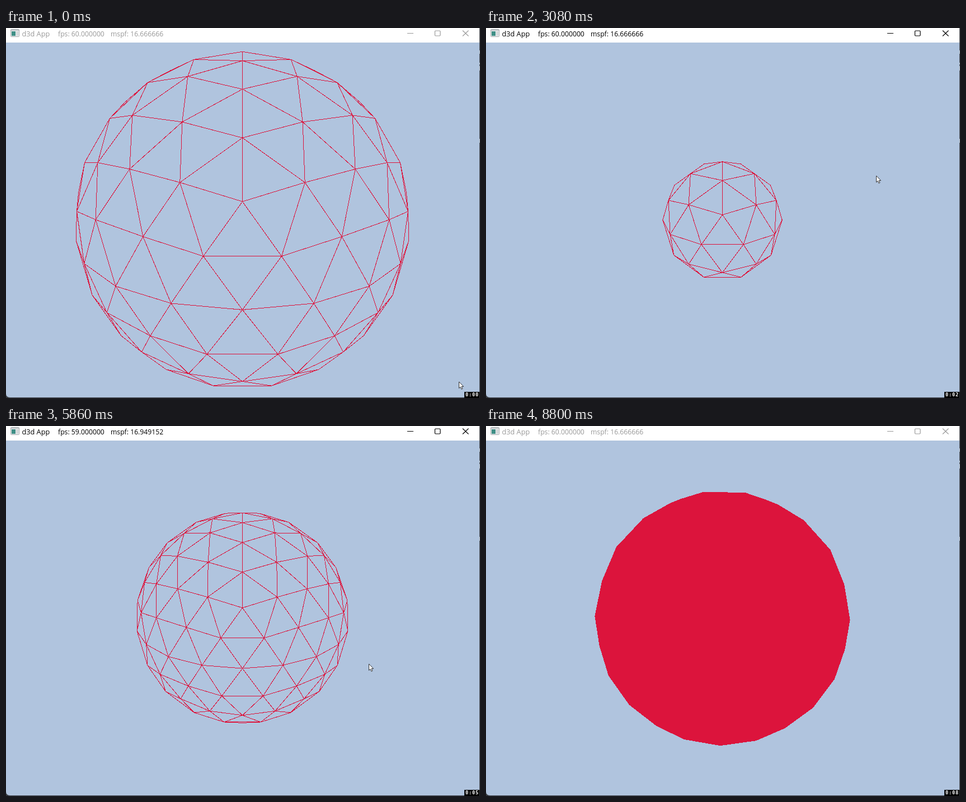
Animation of 847 by 661 pixels, one loop 8870 ms. Source, as an HTML page:

```html
<!DOCTYPE html>
<html lang="en">
<head>
<meta charset="utf-8">
<title>d3d App</title>
<style>
  html, body { margin: 0; width: 100%; height: 100%; overflow: hidden; background: #b0c4de; }
  svg { display: block; width: 847px; height: 661px; }
  .title { font: 12.2px "Open Sans", "Noto Sans", sans-serif; }
  .clock { font: bold 8.5px "DejaVu Sans Mono", monospace; letter-spacing: .9px; }
  .crisp { shape-rendering: crispEdges; }
</style>
</head>
<body>
<svg viewBox="0 0 847 661" xmlns="http://www.w3.org/2000/svg">
  <rect width="847" height="661" fill="#b0c4de"/>
  <path id="ball" class="crisp" stroke="#dc143c" stroke-width="1" stroke-linejoin="bevel"/>

  <rect width="846" height="26" fill="#fff"/>
  <g>
    <rect x="8.5" y="2.5" width="15" height="13" rx="1" fill="#eceeef" stroke="#a3a7aa"/>
    <path d="M9 4h14" stroke="#c3c8cc" stroke-width="2"/>
    <rect x="10" y="6" width="7" height="8" fill="#3f8f86"/>
    <rect x="18" y="6" width="4" height="8" fill="#d3d8da"/>
  </g>
  <g id="bar">
    <text class="title" x="28.5" y="15" style="font-size:12.7px">d3d App</text>
    <text class="title" id="fps" x="93" y="15"></text>
    <text class="title" id="mspf" x="187" y="15"></text>
    <g fill="none" stroke="currentColor">
      <path d="M717 9.5h11"/>
      <rect x="766.5" y="5" width="9.5" height="9" rx="1.2" stroke-width="1.2"/>
      <path d="M816 4.5l10.5 10M826.5 4.5l-10.5 10" stroke-width="1.1"/>
    </g>
  </g>

  <path d="M846.5 0V661" stroke="#3a3d42"/>
  <path d="M846.5 40v6M846.5 62v3M846.5 68v8M846.5 198v7" stroke="#a9adb3"/>
  <path d="M0 653Q0 660 7 660H847V661H0Z" fill="#33363b"/>

  <path id="cursor" d="M.5 0V11.6L3.1 9.2L4.9 13.3L6.8 12.5L5.1 8.5H8.6Z" fill="#fff" stroke="#222" stroke-width=".9"/>

  <rect x="819" y="650" width="27" height="11" fill="#000"/>
  <text class="clock" id="clock" x="821" y="658" fill="#fff"></text>
</svg>
<script>
const LOOP = 8870, FOCAL = 765, CX = 422.5, CY = 343, RAD = Math.PI / 180;
const el = id => document.getElementById(id);

const dot = (a, b) => a[0] * b[0] + a[1] * b[1] + a[2] * b[2];
const sub = (a, b) => a.map((v, i) => v - b[i]);
const cross = (a, b) => [a[1] * b[2] - a[2] * b[1], a[2] * b[0] - a[0] * b[2], a[0] * b[1] - a[1] * b[0]];
const unit = a => a.map(v => v / Math.hypot(...a));
const mid = (a, b) => unit(a.map((v, i) => v + b[i]));

// Icosahedron: every triple of mutually adjacent vertices is a face
function icosahedron() {
  const gold = (1 + Math.sqrt(5)) / 2, pts = [], faces = [];
  for (const s of [-1, 1]) for (const g of [-gold, gold])
    pts.push(unit([s, 0, g]), unit([0, g, s]), unit([g, s, 0]));
  const near = (a, b) => dot(a, b) > 0.4;
  pts.forEach((a, i) => pts.slice(i + 1).forEach((b, j) => pts.slice(i + j + 2).forEach(c => {
    if (near(a, b) && near(b, c) && near(a, c)) faces.push([a, b, c]);
  })));
  return faces;
}

const subdivide = faces => faces.flatMap(([a, b, c]) => {
  const ab = mid(a, b), bc = mid(b, c), ca = mid(c, a);
  return [[a, ab, ca], [ab, b, bc], [ca, bc, c], [ab, bc, ca]];
});

// Attach an outward normal to each face
const withNormals = faces => faces.map(pts => {
  const n = cross(sub(pts[1], pts[0]), sub(pts[2], pts[0]));
  return { pts, n: dot(n, pts[0]) < 0 ? n.map(v => -v) : n };
});

const coarse = icosahedron(), medium = subdivide(coarse), fine = subdivide(medium);
const meshes = [coarse, medium, fine].map(withNormals);

// Monotone cubic through [time, value] keys
function curve(keys) {
  const rate = i => (keys[i + 1][1] - keys[i][1]) / (keys[i + 1][0] - keys[i][0]);
  const slope = keys.map((k, i) => {
    if (!i || i === keys.length - 1) return 0;
    const a = rate(i - 1), b = rate(i);
    return a * b <= 0 ? 0 : 2 * a * b / (a + b);
  });
  return t => {
    const last = keys.length - 1;
    if (t >= keys[last][0]) return keys[last][1];
    let i = 0;
    while (t >= keys[i + 1][0]) i++;
    const h = keys[i + 1][0] - keys[i][0], u = (t - keys[i][0]) / h, w = 1 - u;
    return keys[i][1] * (1 + 2 * u) * w * w + slope[i] * h * u * w * w
      + keys[i + 1][1] * u * u * (3 - 2 * u) - slope[i + 1] * h * u * u * w;
  };
}

const track = [
  [0, 809, 632], [30, 809, 632], [330, 739, 604], [480, 739, 604],
  [1350, 735, 558], [1500, 735, 558], [1560, 737, 561], [2300, 716, 405],
  [3080, 697, 264], [3210, 693, 235], [4080, 675, 0], [4150, 675, 2],
  [5150, 665, 275], [5890, 647, 430], [6080, 640, 456], [6200, 632, 463],
  [6500, 535, 443], [6600, 535, 443], [7200, 320, 352], [7400, 285, 380],
  [7630, 276, 446], [7730, 276, 446], [8380, 420, 665]
];
const mouseX = curve(track.map(k => [k[0], k[1]]));
const mouseY = curve(track.map(k => [k[0], k[2]]));

const distance = curve([
  [0, 2.733], [520, 2.733], [1350, 3.312], [1500, 3.312], [1570, 3.27],
  [2300, 5.2], [3080, 7.17], [3210, 7.5], [4100, 11.5], [4200, 11.5],
  [5150, 7.32], [5890, 4.05], [6100, 3.505]
]);
const theta = curve([[0, 270], [6200, 270], [6500, 245.7], [6600, 245.7], [7200, 195], [7400, 183.3], [7630, 181]]);
const phi = curve([[0, 36], [6200, 36], [6500, 30.9], [6600, 30.9], [7200, 9.5], [7330, 7], [7400, 7.9], [7630, 31.7]]);

const rates = [[0, 60], [1050, 61], [2090, 60], [4170, 59], [6250, 61], [7290, 59], [8330, 60]];

function ballPath(t) {
  const d = distance(t), th = theta(t) * RAD, ph = phi(t) * RAD;
  const ct = Math.cos(th), st = Math.sin(th), cp = Math.cos(ph), sp = Math.sin(ph);
  const toEye = [sp * ct, cp, sp * st], right = [-st, 0, ct], up = [-cp * ct, sp, -cp * st];
  const eye = toEye.map(v => v * d);
  const project = p => {
    const k = FOCAL / (d - dot(p, toEye));
    return (CX + k * dot(p, right)).toFixed(2) + " " + (CY - k * dot(p, up)).toFixed(2);
  };
  const mesh = meshes[d < 5 ? 2 : d < 10 ? 1 : 0];
  return mesh.filter(f => dot(f.n, sub(eye, f.pts[0])) > 0)
    .map(f => "M" + f.pts.map(project).join("L") + "Z").join("");
}

function draw(t) {
  el("ball").setAttribute("d", ballPath(t));
  el("ball").setAttribute("fill", t >= 7730 ? "#dc143c" : "none");

  const ink = t >= 480 && t < 8800 ? "#000" : "#999";
  el("bar").setAttribute("fill", ink);
  el("bar").setAttribute("color", ink);

  const fps = rates.filter(r => r[0] <= t).pop()[1];
  el("fps").textContent = "fps: " + fps.toFixed(6);
  el("mspf").textContent = "mspf: " + (Math.floor(1e9 / fps) / 1e6).toFixed(6);
  el("clock").textContent = "0:0" + Math.max(0, Math.floor((t - 280) / 1040));

  el("cursor").setAttribute("transform", `translate(${Math.round(mouseX(t))} ${Math.round(mouseY(t))})`);
}

const start = performance.now();
function tick() {
  draw((performance.now() - start) % LOOP);
  requestAnimationFrame(tick);
}
tick();
</script>
</body>
</html>
```
